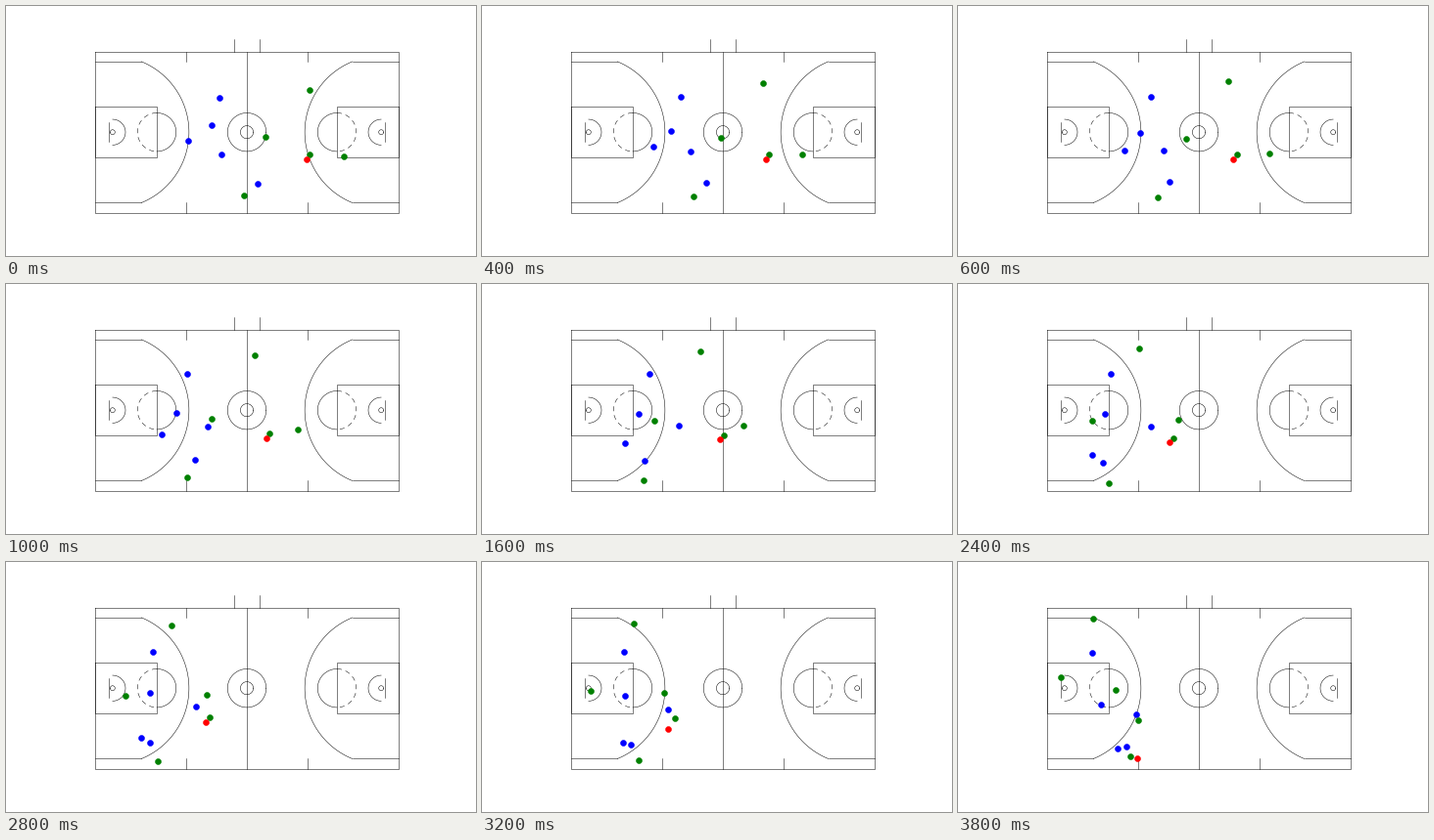
Recreate the animation shown at these times as a matplotlib script. Size 480 by 256 pixels, loop 4 s.

```python
import matplotlib.pyplot as plt
import numpy as np
from matplotlib.animation import FuncAnimation

W, H, DPI = 480, 256, 80
FRAMES, STEP_MS = 20, 200
PX = 72 / DPI                  # one pixel in points
FT = 3.2853                    # pixels per foot
CX, CY = 246, 129.2            # centre of the court

fig = plt.figure(figsize=(W / DPI, H / DPI), dpi=DPI, facecolor="white")
ax = fig.add_axes([0, 0, 1, 1], xlim=(0, W), ylim=(H, 0))
ax.axis("off")


def line(x, y, **style):
    """Draw a line given in feet from the centre spot."""
    ax.plot(CX + FT * np.asarray(x), CY + FT * np.asarray(y),
            color="black", lw=0.5 * PX, zorder=1, **style)


def arc(x, r, start=0, end=360, side=1, **style):
    a = np.radians(np.linspace(start, end, 121))
    line(side * (x + r * np.cos(a)), r * np.sin(a), **style)


def box(x0, y0, x1, y1):
    line([x0, x1, x1, x0, x0], [y0, y0, y1, y1, y0])


def half_court(side):
    hoop, foul, deep = 41.75, 28, 23.75
    box(side * 47.1, -8, side * foul, 8)
    line([side * 43] * 2, [-3, 3])
    arc(hoop, 0.75, side=side)
    arc(hoop, 4, 90, 270, side)
    arc(foul, 6, 90, 270, side)
    arc(foul, 6, -90, 90, side, dashes=(10, 8), dash_capstyle="butt")
    bend = np.degrees(np.arcsin(22 / deep))
    arc(hoop, deep, 180 - bend, 180 + bend, side)
    for y in (-1, 1):
        line([side * 47.1, side * 33], [y * 22] * 2)
        line([side * 19] * 2, [y * 25.1, y * 22])
    line([side * 4] * 2, [-29, -25.1])


box(-47.1, -25.1, 47.1, 25.1)
line([0, 0], [-25.1, 25.1])
arc(0, 6)
arc(0, 2)
for side in (-1, 1):
    half_court(side)

# Each player runs a cubic curve through four points, reached at these steps
KEYS = np.array([0, 5, 14, 19])
BLUE = [
    [(218, 94), (185, 92), (150, 92), (137, 93)],
    [(210, 122), (174, 132), (147, 134), (146, 146)],
    [(186, 138), (159, 154), (138, 180), (163, 191)],
    [(220, 152), (206, 146), (194, 148), (182, 156)],
    [(257, 182), (193, 180), (147, 185), (172, 189)],
]
GREEN = [
    [(310, 86), (254, 73), (169, 65), (138, 58)],
    [(265, 134), (210, 138), (122, 137), (105, 118)],
    [(345, 154), (298, 149), (205, 136), (161, 131)],
    [(310, 152), (269, 153), (208, 159), (184, 162)],   # dribbler
    [(243, 194), (185, 198), (155, 204), (176, 199)],   # receiver
]


def cubics(team):
    points = np.array(team, float).transpose(1, 0, 2).reshape(4, -1)
    return np.linalg.solve(np.vander(KEYS), points)


def positions(curve, t):
    return (t ** np.arange(3, -1, -1.0) @ curve).reshape(-1, 2)


def ball_at(t, dribbler, receiver):
    """Stay beside the dribbler, then pass to the receiver."""
    u = np.clip((t - 15) / 4, 0, 1)
    u = u * u * (3 - 2 * u)
    return (1 - u) * (dribbler + (-3.5, 4.5)) + u * (receiver + (7, 2))


def dots(color, z):
    return ax.plot([], [], "o", color=color, ms=6 * PX, mew=0.5 * PX, zorder=z)[0]


blue_curve, green_curve = cubics(BLUE), cubics(GREEN)
blue, green, ball = dots("blue", 2), dots("green", 3), dots("red", 4)


def update(t):
    greens = positions(green_curve, t)
    blue.set_data(*positions(blue_curve, t).T)
    green.set_data(*greens.T)
    ball.set_data(*ball_at(t, *greens[-2:])[:, None])
    return blue, green, ball


anim = FuncAnimation(fig, update, frames=FRAMES, interval=STEP_MS,
                     repeat=True, repeat_delay=0, blit=False)
plt.show()
```
